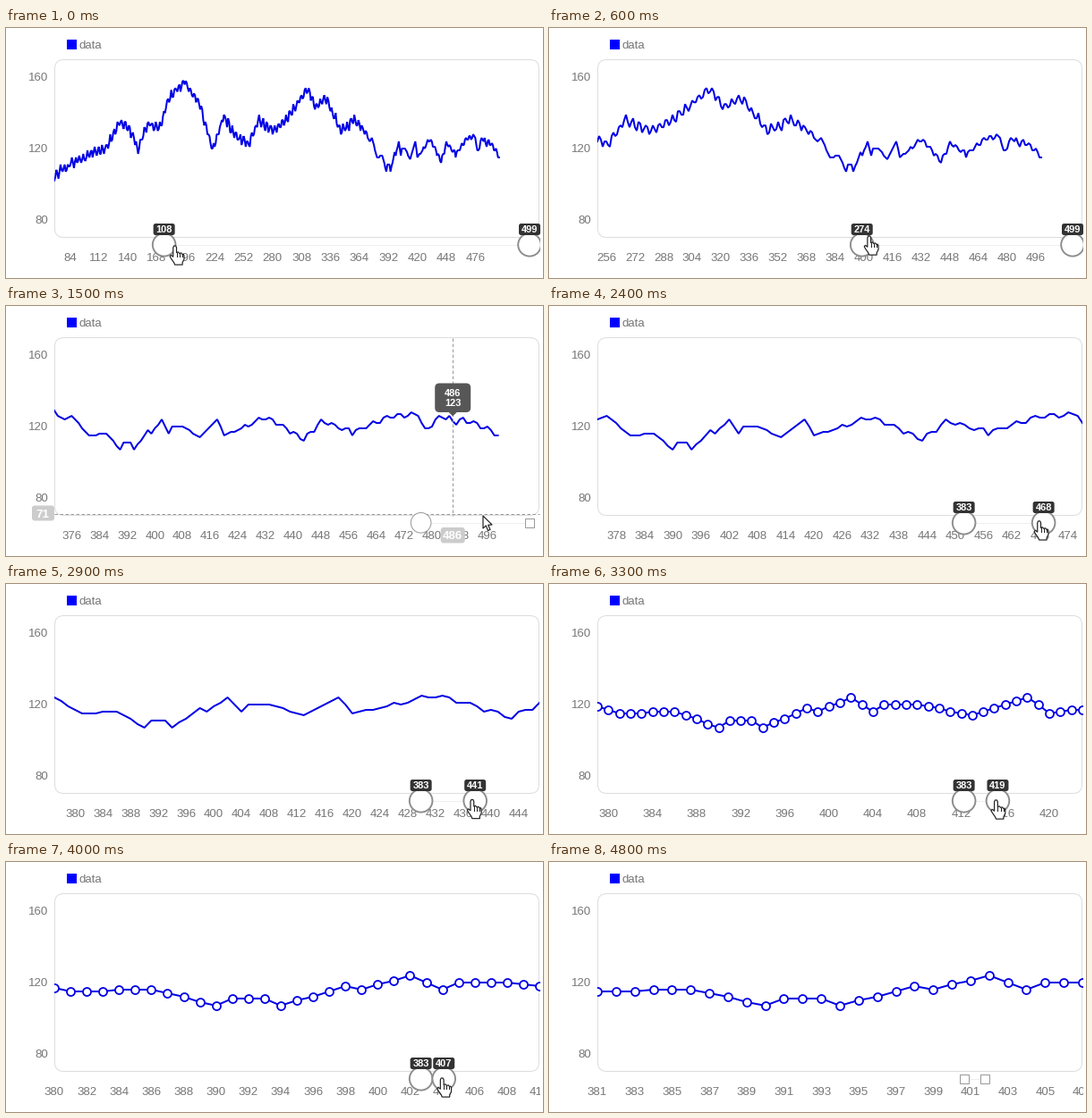
Write a matplotlib script that moves like this. It is 600 by 280 pixels and loops after 5.5 s.

```python
import math
import random

import matplotlib.pyplot as plt
import numpy as np
from matplotlib.animation import FuncAnimation
from matplotlib.patches import Circle, FancyBboxPatch, Polygon, Rectangle

W, H, DPI = 600, 280, 100
PX = 72 / DPI
FRAMES, STEP_MS = 55, 100
LEFT, RIGHT, TOP, BOTTOM = 54, 596, 35.5, 234.5
SLIDER_Y = 242.8
FIRST, LAST = 69, 499
BLUE, GREY = "#0000e4", "#777777"

plt.rcParams["font.family"] = "Liberation Sans"

# Main turns of the series as (index, value); a jagged ripple is added.
TURNS = [
    (69, 105), (87, 112), (120, 121), (132, 135), (141, 132), (150, 119),
    (159, 134), (171, 132), (179, 148), (195, 158), (210, 144), (222, 119),
    (233, 138), (243, 128), (257, 122), (266, 136), (281, 130), (293, 136),
    (314, 154), (321, 143), (332, 148), (346, 130), (359, 136), (371, 128),
    (374, 124), (376, 126), (381, 115), (386, 116), (390, 107), (391, 111),
    (393, 111), (394, 107), (398, 118), (399, 116), (402, 124), (404, 116),
    (405, 120), (408, 120), (413, 114), (418, 124), (420, 115), (432, 125),
    (443, 113), (448, 123), (457, 117), (467, 125), (476, 127), (478, 118),
    (483, 126), (486, 123), (491, 123), (499, 115)]


def build_series():
    rng = random.Random(4)
    xs, ys = zip(*TURNS)
    values = []
    for i in range(FIRST, LAST + 1):
        value = float(np.interp(i, xs, ys))
        if i not in (486, LAST):
            size = np.interp(i, [365, 375, 420, 430], [2.3, 0, 0, 1.4])
            value += size * (math.sin(1.7 * i) + rng.uniform(-0.5, 0.5))
        values.append(round(value))
    return np.array(values)


INDEX = np.arange(FIRST, LAST + 1)
SERIES = build_series()

# Motion keys: frame numbers and the values reached there.
LOW = ([0, 6, 12], [108, 273.7, 382.8])
HIGH = ([18, 20, 21, 24, 33, 40, 45], [499, 492, 492, 468, 419, 407.3, 405.2])
LOW_R = ([13, 15, 17, 18, 43, 46], [13, 11.5, 5, 13, 13, 5])
HIGH_R = ([12, 14, 16, 17, 46, 48], [13, 5, 5, 13, 13, 5])
MOUSE_Y = ([0, 6, 14, 15, 17, 33, 40, 45],
           [244, 233, 232, 235, 240, 242, 242, 247])

HAND = 0.94 * np.array([
    (-2, 2), (-1, 0), (1, 0), (2, 2), (2, 8), (4, 7.3), (5.5, 9), (7.5, 8.4),
    (8.7, 10), (10.2, 9.8), (11, 11.5), (11, 16), (9, 20), (9, 22.5),
    (0, 22.5), (-1, 20), (-4.5, 15), (-5.8, 12.5), (-4.5, 11), (-2, 13)])
ARROW = np.array([(0, 0), (0, 14), (3.3, 11), (5.5, 16.5), (8, 15.5),
                  (5.7, 10.3), (10, 10)])

fig = plt.figure(figsize=(W / DPI, H / DPI), dpi=DPI, facecolor="white")
ax = fig.add_axes([0, 0, 1, 1])


def key(n, keys):
    return float(np.interp(n, *keys))


def value_y(value):
    return BOTTOM - (value - 70) * 1.99


def slider_x(value):
    return 585 - (LAST - value) * 1.0444


def text(x, y, label, size=13.2, color=GREY, ha="center", weight="normal", z=2):
    ax.text(x, y + 0.36 * size, label, fontsize=size * PX, color=color, ha=ha,
            va="baseline", weight=weight, zorder=z)


def box(x, y, w, h, r, fill, edge="none", z=1):
    ax.add_patch(FancyBboxPatch(
        (x, y), w, h, boxstyle=f"round,pad=0,rounding_size={r}", fc=fill,
        ec=edge, lw=PX, zorder=z))


def line(xs, ys, color, width=1, z=2, **style):
    return ax.plot(xs, ys, color=color, lw=width * PX, zorder=z, **style)[0]


def draw_axes(lo, hi):
    unit = (RIGHT - LEFT) / (hi - lo)
    ax.add_patch(Rectangle((68, 13), 11, 11, fc="#0000ff", ec="none"))
    text(82, 18.5, "data", ha="left")
    box(LEFT + 0.5, TOP, RIGHT - LEFT - 1, BOTTOM - TOP, 10, "none", "#dddddd")
    for value in (160, 120, 80):
        text(47, value_y(value) - 0.8, str(value), ha="right")
    step = 2 * (int(30.5 / unit) // 2 + 1)
    start = lo if unit > 20 else -(-lo // step) * step
    for tick in range(start, min(hi, LAST) + 1, step):
        text(LEFT + (tick - lo) * unit, 256.2, str(tick))
    return unit


def draw_series(lo, hi, unit):
    shown = (INDEX >= lo) & (INDEX <= hi)
    curve = line(LEFT + (INDEX[shown] - lo) * unit, value_y(SERIES[shown]),
                 BLUE, 2, z=3, solid_joinstyle="bevel")
    if unit > 12.2:
        curve.set(marker="o", markersize=9 * PX, markerfacecolor="white",
                  markeredgewidth=1.8 * PX)
    curve.set_clip_path(Rectangle((LEFT, TOP), RIGHT - LEFT, BOTTOM - TOP,
                                  transform=ax.transData))


def draw_handle(value, radius, dragging):
    x = slider_x(value)
    if radius <= 6:
        shape = Rectangle((x - 5, SLIDER_Y - 5), 10, 10)
    else:
        shape = Circle((x, SLIDER_Y), radius - 0.2)
    shape.set(facecolor="white", edgecolor="#8c8c8c" if dragging else "#999999",
              linewidth=(1.9 if dragging else 1) * PX, zorder=5)
    ax.add_patch(shape)
    if dragging:
        box(x - 12, 219, 24, 13, 2.5, "#333333", z=6)
        text(x, 225.5, str(round(value)), 11, "white", weight="bold", z=7)


def draw_pointer(index, lo, unit):
    x, y = LEFT + (index - lo) * unit, 232.5
    dash = dict(linestyle=(0, (3.5, 2.5)), z=4)
    line([x, x], [TOP, BOTTOM], "#999999", **dash)
    line([LEFT, RIGHT], [y, y], "#999999", **dash)
    box(29, 223.5, 25, 17, 3, "#cccccc", z=6)
    text(41, 232, "71", color="white", weight="bold", z=7)
    box(x - 13.5, 248, 27, 17.5, 3, "#cccccc", z=6)
    text(x, 256.5, str(index), color="white", weight="bold", z=7)
    box(x - 20, 86.5, 40, 32.5, 5, "#575757", z=6)
    ax.add_patch(Polygon([(x - 5, 118.5), (x + 5, 118.5), (x, 123.5)],
                         fc="#575757", ec="none", zorder=6))
    for row, label in ((97.5, index), (108.5, SERIES[index - FIRST])):
        text(x, row, str(label), 11, "white", weight="bold", z=7)


def draw_mouse(n, low, high):
    if n <= 12:
        x = slider_x(low) + key(n, ([0, 12], [12, 4]))
    elif n < 18:
        x = key(n, ([12, 14, 15, 17], [468, 498, 533, 580]))
    else:
        x = slider_x(high) - key(n, ([24, 33], [5, 2]))
    y = key(n, MOUSE_Y)
    arrow = 13 <= n <= 16
    points = (ARROW if arrow else HAND) + (x, y)
    ax.add_patch(Polygon(points, fc="white", ec="#222222", lw=1.2 * PX,
                         joinstyle="round", zorder=9))
    if not arrow:
        for dx, dy in ((2, 7.5), (5.2, 8.5), (8.2, 9.5)):
            line([x + dx, x + dx], [y + dy, y + 12], "#222222", z=10)


def draw(n):
    ax.clear()
    ax.set(xlim=(0, W), ylim=(H, 0))
    ax.axis("off")

    low, high = key(n, LOW), key(n, HIGH)
    margin = (high - low) / 10
    lo, hi = round(low - margin), round(high + margin)
    unit = draw_axes(lo, hi)
    draw_series(lo, hi, unit)

    dragging = n <= 12 or 18 <= n <= 43
    line([slider_x(low), slider_x(high)], [SLIDER_Y] * 2, "#eeeeee", z=4)
    draw_handle(low, key(n, LOW_R), dragging)
    draw_handle(high, key(n, HIGH_R), dragging)
    if n in (14, 15):
        draw_pointer(486, lo, unit)
    # The chart is cut off at its right edge.
    ax.add_patch(Rectangle((597, 0), 3, H, fc="white", ec="none", zorder=8))
    if n <= 45:
        draw_mouse(n, low, high)
    return []


anim = FuncAnimation(fig, draw, frames=FRAMES, interval=STEP_MS, repeat=True,
                     repeat_delay=0, blit=False)
plt.show()
```
